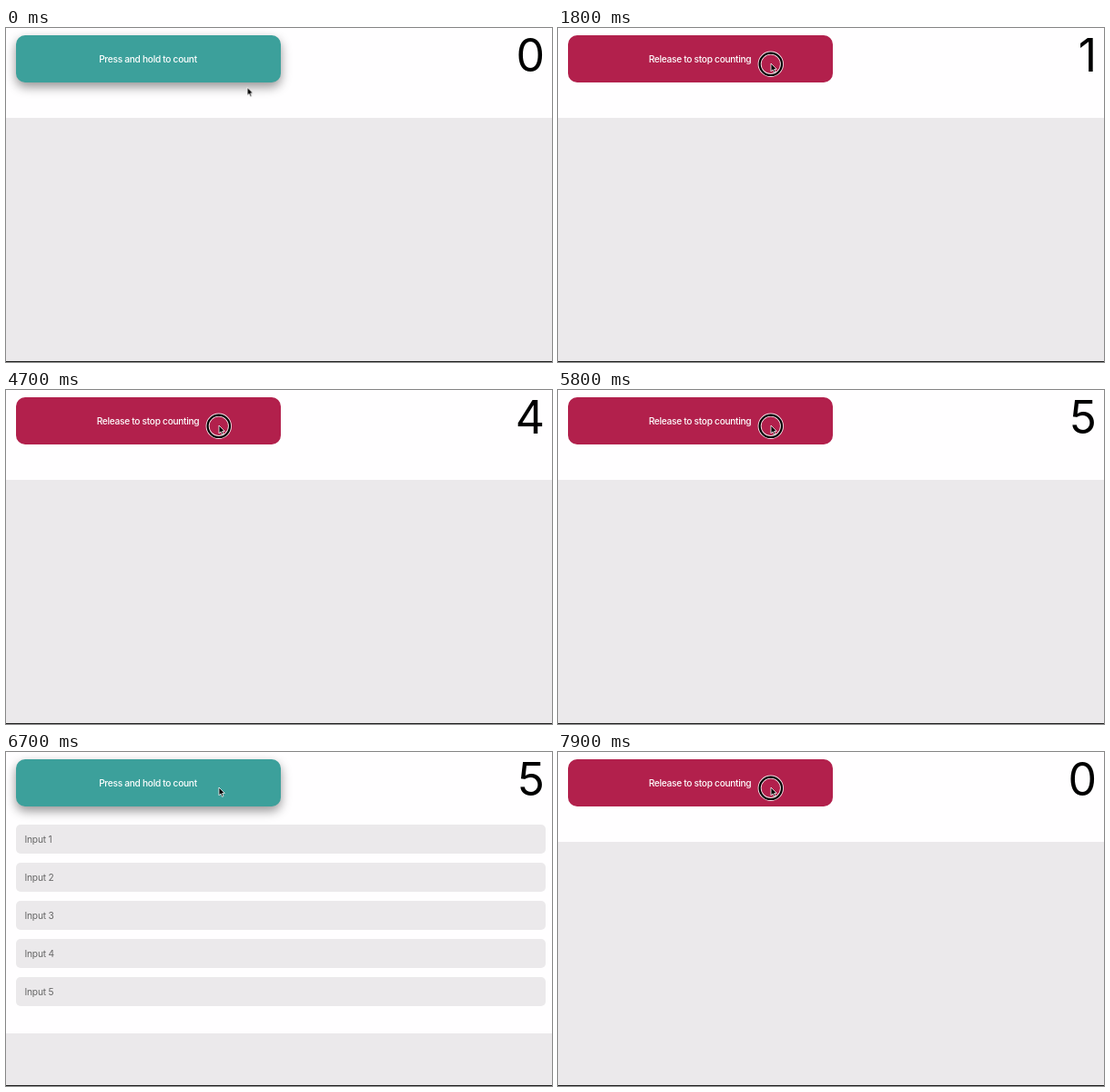
Write an HTML page that moves like this. It is 600 by 368 pixels and loops after 8 s.

```html
<!DOCTYPE html>
<html lang="en">
<head>
<meta charset="utf-8">
<title>Press and hold counter</title>
<style>
  html, body { margin: 0; width: 100%; height: 100%; overflow: hidden; }
  body { position: relative; font-family: Inter, Roboto, sans-serif; background: #ebe9eb; }
  body > *, .stack > * { position: absolute; }
  #panel { left: 0; top: 0; width: 600px; height: 99px; background: #fffeff; }
  #floor { left: 0; top: 367px; width: 600px; height: 1px; background: #202020; }
  #button { left: 10.5px; top: 7.5px; width: 291px; height: 52px; border-radius: 10px; }
  #button span {
    inset: 0; line-height: 52px; text-align: center; color: #fff;
    font-size: 10.2px; font-weight: 500; letter-spacing: -.03em;
  }
  #count { right: 8px; top: 0; width: 60px; height: 60px; }
  #count span { right: 0; top: 0; line-height: 60px; font-size: 50px; color: #000; }
  #list { left: 10.5px; top: 79.5px; width: 582px; }
  #list div {
    box-sizing: border-box; height: 32px; margin-bottom: 10.2px; padding-left: 10px;
    border-radius: 5px; background: #ebe9eb; color: #666;
    font-size: 10.2px; line-height: 32px; letter-spacing: -.02em;
  }
  #ring, #arrow { left: 0; top: 0; overflow: visible; }
</style>
</head>
<body>
<div id="panel"></div>
<div id="list"></div>
<div id="button" class="stack"></div>
<div id="count" class="stack"></div>
<svg id="ring" width="1" height="1" fill="none">
  <circle cx="233.8" cy="39.8" r="12.2" stroke="#fff" stroke-opacity=".85" stroke-width="4"/>
  <circle cx="233.8" cy="39.8" r="12.2" stroke="#000" stroke-width="2.2"/>
</svg>
<svg id="arrow" width="1" height="1">
  <path d="M0 0V8.8L2 6.9L3.5 10.3L5 9.6L3.6 6.4H6.3Z" fill="#000" stroke="#fff" stroke-width=".8" stroke-linejoin="round"/>
</svg>
<div id="floor"></div>
<script>
const LOOP = 8000;
const PRESS = 700, RELEASE = 6000, PRESS_AGAIN = 7300;
const FADE_IN = 300, FADE_OUT = 700;
const TICKS = [1700, 2700, 3700, 4700, 5600];

const $ = id => document.getElementById(id);

// Each step is [time, style, easing towards the next step].
function play(el, steps) {
  const frames = steps.map(([time, style, easing = 'linear']) =>
    ({ ...style, offset: time / LOOP, easing }));
  el.animate(frames, { duration: LOOP, iterations: Infinity });
}

// Hard changes: every style holds until the next step.
function hold(el, steps) {
  const last = steps[steps.length - 1][1];
  play(el, [...steps.map(([time, style]) => [time, style, 'steps(1, end)']), [LOOP, last]]);
}

// Visible only during the given [from, to] spans.
function show(el, ...spans) {
  const steps = spans.flatMap(([from, to]) => [[from, { opacity: 1 }], [to, { opacity: 0 }]]);
  if (steps[0][0] > 0) steps.unshift([0, { opacity: 0 }]);
  hold(el, steps.filter(([time]) => time < LOOP));
}

function add(parent, tag, text) {
  const el = document.createElement(tag);
  el.textContent = text;
  return parent.appendChild(el);
}

for (let i = 1; i <= 5; i++) add($('list'), 'div', `Input ${i}`);

const held = [[PRESS, RELEASE], [PRESS_AGAIN, LOOP]];
const idle = [[0, PRESS], [RELEASE, PRESS_AGAIN]];
show(add($('button'), 'span', 'Press and hold to count'), ...idle);
show(add($('button'), 'span', 'Release to stop counting'), ...held);
show($('ring'), ...held);
show($('list'), [RELEASE, PRESS_AGAIN]);

const ends = [...TICKS, PRESS_AGAIN];
ends.forEach((end, n) => {
  const spans = n ? [[ends[n - 1], end]] : [[0, end], [PRESS_AGAIN, LOOP]];
  show(add($('count'), 'span', n), ...spans);
});

hold($('panel'), [
  [0, { height: '99px' }],
  [RELEASE, { height: '310px' }],
  [PRESS_AGAIN, { height: '99px' }]
]);

const up = { backgroundColor: '#3ca09b', boxShadow: '0 5px 12px rgba(0,0,0,.42)' };
const down = { backgroundColor: '#b2204c', boxShadow: '0 0 0 rgba(0,0,0,0)' };
play($('button'), [
  [0, up],
  [PRESS, up, 'ease'],
  [PRESS + FADE_IN, down],
  [RELEASE, down, 'ease'],
  [RELEASE + FADE_OUT, up],
  [PRESS_AGAIN, up, 'ease'],
  [PRESS_AGAIN + FADE_IN, down],
  [LOOP, down]
]);

const away = { transform: 'translate(265.2px, 65.5px)' };
const over = { transform: 'translate(234px, 39px)' };
play($('arrow'), [[0, away], [50, away, 'ease-out'], [300, over], [LOOP, over]]);
</script>
</body>
</html>
```
